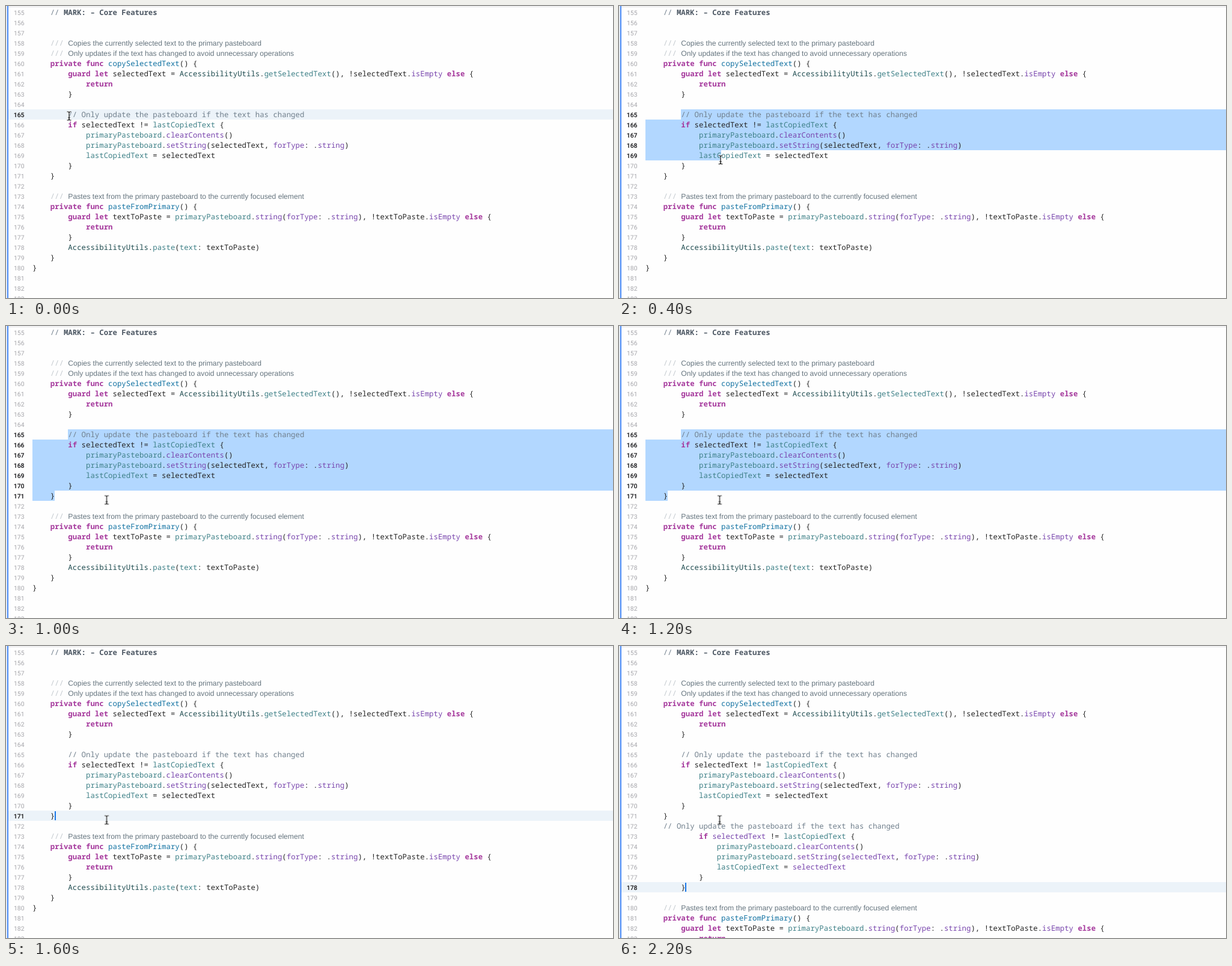
Write an HTML page that moves like this. It is 1010 px wide and 486 px high and loops after 2.8 s.

```html
<!DOCTYPE html>
<html lang="en">
<head>
<meta charset="utf-8">
<title>Code editor</title>
<style>
  html, body { margin: 0; width: 100%; height: 100%; overflow: hidden; background: #fefefe; }
  #stage { position: relative; width: 1010px; height: 486px; overflow: hidden; background: #fefefe; }
  #stage > * { position: absolute; left: 0; top: 0; }
  svg { width: 1010px; height: 486px; overflow: hidden; }

  .anim { animation: 2800ms step-end infinite; }
  #topline { top: 1px; width: 1010px; height: 1px; background: #e2e2e4; }
  #edge { width: 2px; height: 486px; background: #e1eaf7; border-right: 2px solid #4d8df6; }
  #row { left: 4px; width: 1006px; height: 17px; background: #ecf3f9; animation-name: row; }
  #sel { width: 1010px; height: 486px; background: #b2d7ff; animation-name: sel; }
  #flash { left: 309px; top: 88px; width: 11px; height: 16px; border-radius: 4px; background: #fcee68;
           box-shadow: 0 0 2px rgba(120, 110, 0, .35); animation-name: flash; }
  #caret { width: 2px; height: 15px; background: #1a78e8; animation-name: caret; }
  #active { animation-name: active; }
  #tail { animation-name: tail; }
  #paste { animation-name: paste; }
  #beam { animation-name: beam; }

  text { font: 12.36px "Noto Sans Mono", "DejaVu Sans Mono", monospace; fill: #262626;
         white-space: pre; text-rendering: geometricPrecision; font-variant-ligatures: none; }
  .num { font: 10.4px Roboto, Inter, sans-serif; fill: #a6a6ab; text-anchor: end; }
  #active .num { font-weight: 500; fill: #1c1c1e; }
  .key { font-weight: 600; fill: #a5389c; }
  .decl { fill: #1272a2; }
  .type { fill: #1f4c50; }
  .own { fill: #3e8087; }
  .sys { fill: #7845ad; }
  .note { fill: #707f8c; }
  .mark { font-weight: 700; fill: #4c5763; }
  .slash { fill: #c3c9ce; }
  .doc { font: 12.17px "Liberation Sans", Arial, sans-serif; fill: #66757f; font-kerning: none; }

  @keyframes row {
    0% { transform: translateY(172px); visibility: visible; }
    7.143% { transform: translateY(172px); visibility: hidden; }
    50% { transform: translateY(274px); visibility: visible; }
    64.286% { transform: translateY(291px); visibility: visible; }
    78.571%, 100% { transform: translateY(393px); visibility: visible; }
  }
  @keyframes sel {
    0% { visibility: hidden; clip-path: none; }
    7.143% { visibility: visible; clip-path: polygon(103px 172px, 1010px 172px, 1010px 223px, 148px 223px, 148px 240px, 44px 240px, 44px 189px, 103px 189px); }
    14.286% { visibility: visible; clip-path: polygon(103px 172px, 1010px 172px, 1010px 240px, 170px 240px, 170px 257px, 44px 257px, 44px 189px, 103px 189px); }
    21.429% { visibility: visible; clip-path: polygon(103px 172px, 1010px 172px, 1010px 274px, 81px 274px, 81px 291px, 44px 291px, 44px 189px, 103px 189px); }
    50%, 100% { visibility: hidden; clip-path: none; }
  }
  @keyframes active {
    0% { clip-path: inset(172px 0 297px 0); }
    7.143% { clip-path: inset(172px 0 246px 0); }
    14.286% { clip-path: inset(172px 0 229px 0); }
    21.429% { clip-path: inset(172px 0 195px 0); }
    50% { clip-path: inset(274px 0 195px 0); }
    64.286% { clip-path: inset(291px 0 178px 0); }
    78.571%, 100% { clip-path: inset(393px 0 76px 0); }
  }
  @keyframes flash {
    0% { visibility: hidden; }
    50% { visibility: visible; }
    57.143%, 100% { visibility: hidden; }
  }
  @keyframes caret {
    0% { visibility: hidden; transform: translate(81px, 275px); }
    50% { visibility: visible; transform: translate(81px, 275px); }
    64.286% { visibility: visible; transform: translate(73px, 292px); }
    78.571%, 100% { visibility: visible; transform: translate(110px, 394px); }
  }
  @keyframes tail {
    0% { transform: translateY(0); }
    64.286% { transform: translateY(17px); }
    78.571%, 100% { transform: translateY(119px); }
  }
  @keyframes paste {
    0% { visibility: hidden; }
    78.571%, 100% { visibility: visible; }
  }
  @keyframes beam {
    0% { transform: translate(105px, 183px); }
    7.143% { transform: translate(151.5px, 229px); }
    14.286% { transform: translate(169px, 256px); }
    21.429% { transform: translate(180.5px, 279px); }
    28.571% { transform: translate(172px, 286px); }
    35.714%, 100% { transform: translate(167.5px, 289.5px); }
  }
</style>
</head>
<body>
<div id="stage">
  <div id="row" class="anim"></div>
  <div id="sel" class="anim"></div>
  <div id="flash" class="anim"></div>
  <div id="topline"></div>
  <div id="edge"></div>
  <svg id="gutter"></svg>
  <svg id="active" class="anim"></svg>
  <svg>
    <g id="head"></g>
    <g id="paste" class="anim"></g>
    <g id="tail" class="anim"></g>
  </svg>
  <div id="caret" class="anim"></div>
  <svg>
    <defs>
      <path id="ibeam" d="M-3.5 -7H-2Q0 -7 0 -5Q0 -7 2 -7H3.5M0 -5V5M-3.5 7H-2Q0 7 0 5Q0 7 2 7H3.5M-1.8 3H1.8"/>
    </defs>
    <g id="beam" class="anim" fill="none">
      <use href="#ibeam" stroke="#fff" stroke-opacity=".75" stroke-width="2.6"/>
      <use href="#ibeam" stroke="#111" stroke-width="1.2"/>
    </g>
  </svg>
</div>
<script>
  const CHAR = 7.417, LEFT = 44, LINE = 17, BASE = 15, FIRST = 155;
  const $ = id => document.getElementById(id);

  const groups = {
    key: 'private func guard let return if else',
    decl: 'copySelectedText pasteFromPrimary',
    type: 'AccessibilityUtils',
    own: 'getSelectedText lastCopiedText primaryPasteboard paste text',
    sys: 'isEmpty clearContents setString forType string'
  };
  const kinds = {};
  for (const kind in groups) groups[kind].split(' ').forEach(word => kinds[word] = kind);

  function put(parent, str, x, y, cls) {
    const el = document.createElementNS('http://www.w3.org/2000/svg', 'text');
    el.setAttribute('x', x);
    el.setAttribute('y', y);
    if (cls) el.setAttribute('class', cls);
    el.textContent = str;
    parent.appendChild(el);
  }

  function drawLine(parent, src, row, extra) {
    const at = (str, col, cls) => put(parent, str, LEFT + col * CHAR, BASE + row * LINE, cls);
    const note = src.match(/^( *)(\/\/\/?) (.*)/);
    if (note) {
      const [, pad, slashes, body] = note;
      const col = pad.length, isDoc = slashes.length === 3;
      at(slashes, col, isDoc ? 'slash' : 'note');
      at(body, col + slashes.length + 1, isDoc ? 'doc' : body.startsWith('MARK') ? 'mark' : 'note');
      return;
    }
    for (const m of src.matchAll(/\w+|[^\w\s]+/g)) at(m[0], m.index, extra[m[0]] || kinds[m[0]]);
  }

  function drawBlock(id, firstRow, src, extra = {}) {
    src.split('\n').slice(1, -1).forEach((line, i) => drawLine($(id), line, firstRow + i, extra));
  }

  for (let i = 0; i < 29; i++) {
    for (const id of ['gutter', 'active']) put($(id), FIRST + i, 30.5, BASE + i * LINE, 'num');
  }

  drawBlock('head', 0, `
    // MARK: – Core Features


    /// Copies the currently selected text to the primary pasteboard
    /// Only updates if the text has changed to avoid unnecessary operations
    private func copySelectedText() {
        guard let selectedText = AccessibilityUtils.getSelectedText(), !selectedText.isEmpty else {
            return
        }

        // Only update the pasteboard if the text has changed
        if selectedText != lastCopiedText {
            primaryPasteboard.clearContents()
            primaryPasteboard.setString(selectedText, forType: .string)
            lastCopiedText = selectedText
        }
    }
`);

  drawBlock('paste', 17, `
    // Only update the pasteboard if the text has changed
            if selectedText != lastCopiedText {
                primaryPasteboard.clearContents()
                primaryPasteboard.setString(selectedText, forType: .string)
                lastCopiedText = selectedText
            }
        }
`, { selectedText: 'sys' });

  drawBlock('tail', 18, `
    /// Pastes text from the primary pasteboard to the currently focused element
    private func pasteFromPrimary() {
        guard let textToPaste = primaryPasteboard.string(forType: .string), !textToPaste.isEmpty else {
            return
        }
        AccessibilityUtils.paste(text: textToPaste)
    }
}
`);
</script>
</body>
</html>
```
